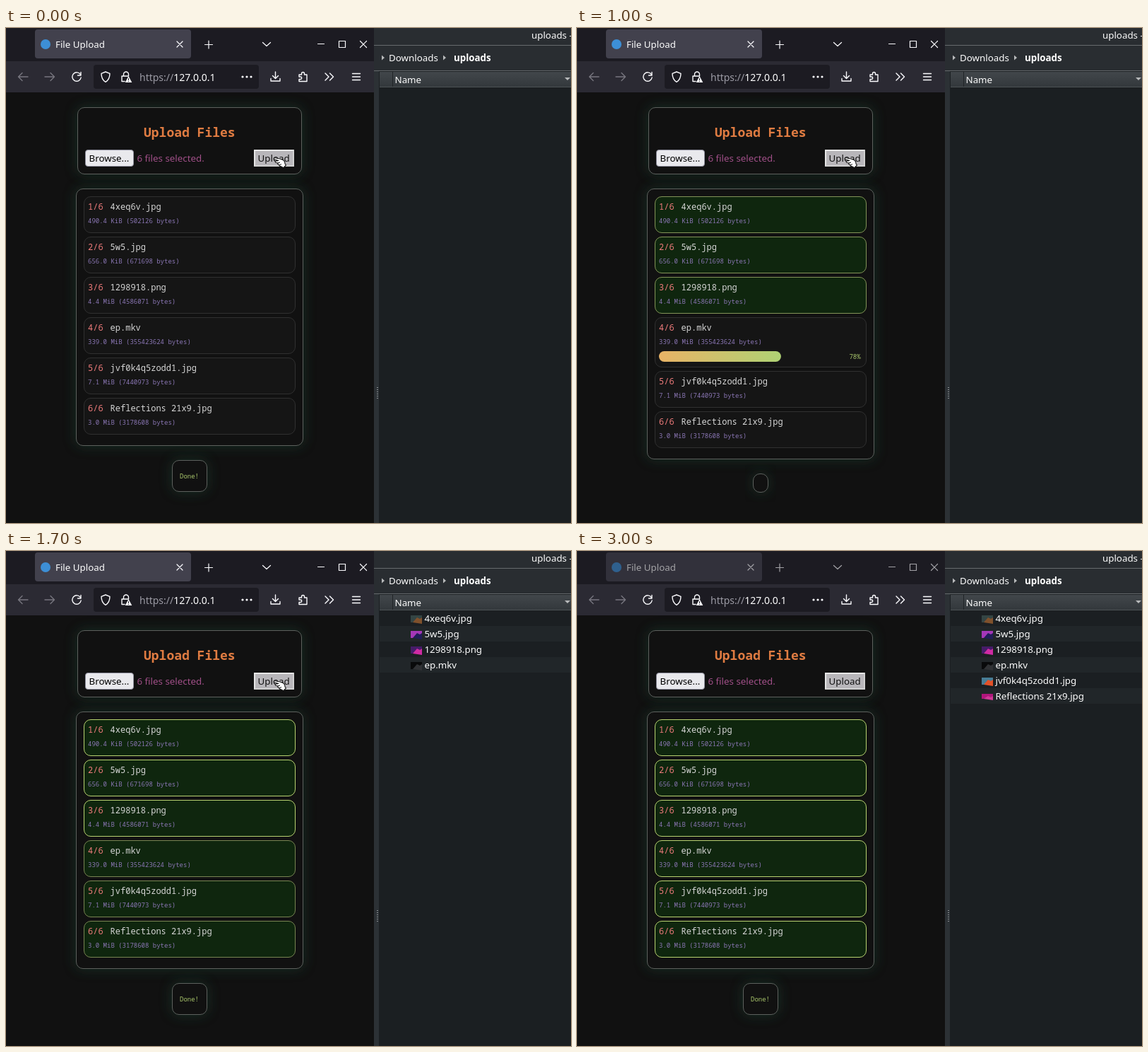
These frames come from a looping animation (800x700 px, 3.3 s). An HTML page:

```html
<!DOCTYPE html>
<html lang="en">
<head>
<meta charset="utf-8">
<title>File Upload</title>
<style>
html, body { margin: 0; width: 100%; height: 100%; overflow: hidden; background: #111; }
svg { display: block; width: 800px; height: 700px; }
text { font: 13.33px "Noto Sans", sans-serif; fill: #fcfcfc; white-space: pre; }
.mono { font: 12px "Noto Sans Mono", monospace; fill: #d6d6d6; }
.small { font: 9px "Noto Sans Mono", monospace; fill: #8a76b4; }
.green { fill: #a9c66c; }
.line { fill: none; stroke: #fbfbfe; stroke-width: 1.4; stroke-linecap: round; stroke-linejoin: round; }
.off { stroke: #77767f; }
</style>
</head>
<body>
<svg viewBox="0 0 800 700">
  <defs>
    <filter id="blur" x="-50%" y="-50%" width="200%" height="200%"><feGaussianBlur stdDeviation="9"/></filter>
    <linearGradient id="bar"><stop stop-color="#e8b366"/><stop offset="1" stop-color="#afd274"/></linearGradient>
    <linearGradient id="head" x2="0" y2="1"><stop stop-color="#42474b"/><stop offset="1" stop-color="#33383c"/></linearGradient>
  </defs>

  <!-- File manager -->
  <rect x="521" width="279" height="700" fill="#1b1f22"/>
  <rect x="521" width="279" height="61" fill="#292d31"/>
  <path d="M521 24.5H800M521 60.5H800" stroke="#666a6d"/>
  <rect x="521" y="61" width="7" height="639" fill="#2c3135"/>
  <rect x="529" y="62" width="271" height="21" fill="url(#head)"/>
  <path d="M547.5 62V83" stroke="#202427"/>
  <path d="M529 83.5H800" stroke="#4c5154"/>
  <path d="M526 508V524" stroke="#8b8f92" stroke-width="2" stroke-dasharray="1 2"/>
  <path d="M532 38.500l4 3.500-4 3.500zM619 38.500l4 3.500-4 3.500zM791 70h8l-4 4z" fill="#b8babb"/>
  <text x="744" y="15">uploads —</text>
  <text x="542" y="47">Downloads</text>
  <text x="634" y="47" style="font-weight:bold">uploads</text>
  <text x="550.500" y="78">Name</text>
  <g id="files"></g>

  <!-- Browser -->
  <rect width="521" height="47" fill="#1c1b22"/>
  <g id="tabs">
    <rect x="41" y="2" width="221" height="41" rx="4" fill="#42414d"/>
    <circle cx="56" cy="23" r="7" fill="#3d8fd6"/>
    <text x="70" y="28">File Upload</text>
    <path class="line" style="stroke-width:1.2" d="M242 19l8 8m0-8l-8 8M281.500 23.500h11m-5.500-5.500v11M363.500 20.500l5.500 5 5.500-5M441.500 22.500h9M471.500 18.500h9v9h-9zM501.500 18.500l9 9m0-9l-9 9"/>
  </g>
  <rect y="47" width="521" height="44" fill="#2b2a33"/>
  <rect x="124" y="52" width="234" height="34" rx="4" fill="#1c1b22"/>
  <path class="line off" d="M31 69H17.500m5.500-5.500L17.500 69l5.500 5.500M55 69h13.500m-5.500-5.500l5.500 5.500-5.500 5.500"/>
  <path class="line" d="M105.500 66a6.200 6.200 0 1 0 .7 4M106 62.500v4.500h-4.500M141 62l6 2.300c0 5-1 9.200-6 12-5-2.800-6-7-6-12zM166.500 68v-2.500a3.500 3.500 0 0 1 7 0V68M168 75.500h-4v-7.500h9M381.500 62v9m-4-3.500l4 4 4-4M375 71.500v3.500h13v-3.500M415 66h3.500v-1.500a2 2 0 0 1 4 0V66h3.500v9.500h-11v-3h2a1.700 1.700 0 0 0 0-3.500h-2zM452 64l5 5-5 5M458.500 64l5 5-5 5M490.500 64.500h11m-11 4.500h11m-11 4.500h11"/>
  <path d="M173.500 68l4.800 9h-9.600z" fill="#fbfbfe"/>
  <path d="M173.500 71v3m0 1v1" stroke="#1c1b22"/>
  <g fill="#fbfbfe"><circle cx="335" cy="69" r="1.600"/><circle cx="341" cy="69" r="1.600"/><circle cx="347" cy="69" r="1.600"/></g>
  <text x="189" y="75" style="font-size:14px"><tspan fill="#9a99a3">https://</tspan>127.0.0.1</text>

  <!-- Page -->
  <rect y="91" width="521" height="609" fill="#111"/>
  <g id="page"></g>
  <text x="195" y="154" class="mono" style="font-size:18px;font-weight:bold;fill:#e07c42">Upload Files</text>
  <rect x="112.500" y="172.500" width="68" height="23" rx="3.500" fill="#e9e9ed" stroke="#8f8f9d"/>
  <text x="117.500" y="189" style="fill:#000">Browse...</text>
  <text x="185.500" y="189" style="fill:#a04f88">6 files selected.</text>
  <rect x="351" y="172" width="57" height="24" fill="#b8b6ba"/>
  <path d="M351 196V172H408L406 174H353V194z" fill="#e6e6e6"/>
  <path d="M351 196H408V172L406 174V194H353z" fill="#d0d0d0"/>
  <text x="356.500" y="189" style="fill:#111">Upload</text>
  <g id="pointer"></g>
</svg>

<script>
const LOOP = 3300, STEP = 100;
const items = [
  ['4xeq6v.jpg', '490.4 KiB (502126 bytes)', '#344544', '#80512c'],
  ['5w5.jpg', '656.0 KiB (671698 bytes)', '#a437b8', '#211d58'],
  ['1298918.png', '4.4 MiB (4586071 bytes)', '#451c68', '#d02ba4'],
  ['ep.mkv', '339.0 MiB (355423624 bytes)', '#090a0b', '#303235'],
  ['jvf0k4q5zodd1.jpg', '7.1 MiB (7440973 bytes)', '#477d96', '#e45128'],
  ['Reflections 21x9.jpg', '3.0 MiB (3178608 bytes)', '#b0167c', '#cf3a98']
];
// Pointer positions: time, x, y
const path = [[1700, 381, 183], [1800, 369, 178], [2000, 317, 159], [2300, 124, 71], [2400, 101, 38]];

const $ = id => document.getElementById(id);
const clamp = v => Math.max(0, Math.min(1, v));
const mix = (a, b, k) => `rgb(${a.map((v, i) => Math.round(v + (b[i] - v) * k))})`;
const label = (x, y, s, cls = '', fill = '') =>
  `<text x="${x}" y="${y}" class="${cls}"${fill && ` style="fill:${fill}"`}>${s}</text>`;
const rect = (x, y, w, h, r, fill, stroke) =>
  `<rect x="${x + .5}" y="${y + .5}" width="${w - 1}" height="${h - 1}" rx="${r}" fill="${fill}" stroke="${stroke}"/>`;
const panel = (x, y, w, h) =>
  `<rect x="${x}" y="${y}" width="${w}" height="${h}" rx="10" fill="#1c4a34" opacity=".5" filter="url(#blur)"/>` +
  rect(x, y, w, h, 9.5, '#111', '#5d605d');

function ease(t) {
  const s = clamp(t) ** .55;
  return s * s * (3 - 2 * s);
}

function card(i, y, t, open) {
  const start = i < 3 ? 660 : 1420;
  const done = t >= (i < 3 ? 700 : 1500);
  const edge = done ? mix([51, 51, 51], [184, 210, 112], ease((t - start) / 950)) : '#303030';
  let s = rect(110, y, 300, open ? 71 : 52, 9.5, done ? '#0f260e' : '#151515', edge) +
    label(116, y + 19, `${i + 1}/6`, 'mono', '#ee7b7b') +
    label(147.6, y + 19, items[i][0], 'mono') +
    label(116, y + 38, items[i][1], 'small');
  if (!open) return s;
  if (i === 1) return s + label(380, y + 60, '....', 'small', '#b0b0b0');
  const part = Math.min(1, .38 + (t - 800) / 500);
  const shown = part < 1 ? Math.max(.06, part - .115) : 1;
  const pct = Math.round(part * 100) + '%';
  return s + `<rect x="116" y="${y + 48}" width="${260 * shown}" height="15" rx="7.5" fill="url(#bar)"/>` +
    label(401.6 - pct.length * 5.4, y + 59, pct, 'small green');
}

function page(t) {
  const busy = t >= 600 && t < 1500;
  const active = busy ? (t < 700 ? 1 : 3) : -1;
  let s = panel(101, 112, 318, 95) + panel(99, 227, 322, busy ? 383 : 364);
  let y = 238;
  items.forEach((_, i) => {
    s += card(i, y, t, i === active);
    y += i === active ? 76 : 57;
  });
  return s + (busy ? panel(249, 630, 22, 27)
    : panel(235, 611, 50, 45) + label(246, 637, 'Done!', 'small green'));
}

function files(t) {
  const count = t < 1700 ? 0 : t < 1800 ? 4 : 6;
  return items.slice(0, count).map(([name, , a, b], i) => {
    const y = 84 + i * 22;
    const stripe = i % 2 ? `<rect x="529" y="${y + 22 - 22}" width="271" height="22" fill="#212629"/>` : '';
    const plain = i === 5 && t < 2200 || i === 4 && t < 1900;
    const [top, h] = i === 5 ? [y + 8, 7] : [y + 7, 10];
    const icon = plain
      ? `<rect x="574" y="${y + 5}" width="13" height="13" fill="#5bb5ad"/><path d="M575 ${y + 16}l3-5 2 2 3-4 3 7z" fill="#effafa"/>`
      : `<rect x="573" y="${top}" width="16" height="${h}" fill="${a}"/><path d="M576 ${top + h}l6-${h - 3} 4 2 3-2v${h - 1}z" fill="${b}"/>`;
    return stripe + icon + label(592.5, y + 16, name);
  }).join('');
}

function pointer(t) {
  if (t < 1800) return `<path d="M379.500 183.500q-1 2 1.500 2.700l5 1.300-4 .7q-1.500 1 0 2l3 .8q-1 1.500 1 2.200l1 .4q-.5 1.500 1.500 2l2.500.8 1.500 1.600 4-4-1.500-2q0-4-3-5.500l-4-1.500z" fill="#fff" stroke="#111" stroke-width="1.100"/>
    <path d="M385 191l3-1M387 194l3-1.500" stroke="#111"/>`;
  if (t > 2400) return '';
  const n = path.findIndex(p => p[0] >= t);
  const [t0, x0, y0] = path[n - 1], [t1, x1, y1] = path[n];
  const k = (t - t0) / (t1 - t0);
  return `<path transform="translate(${x0 + (x1 - x0) * k} ${y0 + (y1 - y0) * k})" d="M.7 1V17l3.600-3.400 2.800 6.200 2.600-1.200-2.700-6h4.700z" fill="#111" stroke="#fff" stroke-width="1.100"/>`;
}

let last = -1;
function draw(now) {
  const t = Math.floor(now % LOOP / STEP) * STEP;
  if (t !== last) {
    last = t;
    $('page').innerHTML = page(t);
    $('files').innerHTML = files(t);
    $('pointer').innerHTML = pointer(t);
    $('tabs').setAttribute('opacity', 1 - .4 * clamp((t - 2700) / 300));
  }
  requestAnimationFrame(() => draw(performance.now()));
}
draw(performance.now());
</script>
</body>
</html>
```
